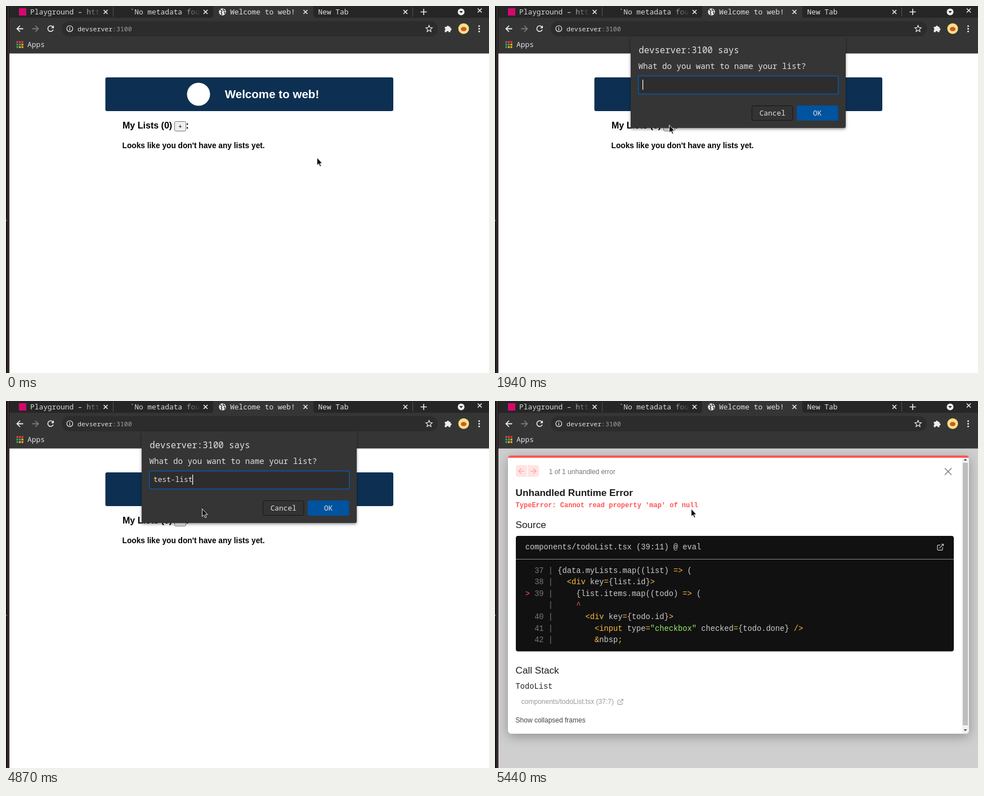
An HTML page for the animation above (8 s loop, 858 by 653 pixels).

```html
<!DOCTYPE html>
<html lang="en">
<head>
<meta charset="utf-8">
<title>List prompt</title>
<style>
  html, body { margin: 0; width: 100%; height: 100%; overflow: hidden; background: #fff; }
  svg { position: absolute; left: 0; top: 0; overflow: visible; }
  text { white-space: pre; font-family: "Liberation Sans", Arial, sans-serif; }
  .ui { font: 12.86px "Noto Sans Mono", "DejaVu Sans Mono", monospace; fill: #e2e2e2; }
  .mono { font: 13.71px "Liberation Mono", monospace; }
  .b { font-weight: bold; }
  .h { font-size: 17.14px; fill: #1b1b1b; }
  .s { font-size: 12px; }
  .line { fill: none; stroke: #eee; stroke-width: 1.6; }
  #prompt {
    left: 241px; top: 54px; border-radius: 3px; background: #353535;
    box-shadow: 0 2px 5px rgba(0, 0, 0, .45); transform-origin: 50% 50%;
  }
</style>
</head>
<body>
<svg id="stage" width="858" height="653" viewBox="0 0 858 653">
  <defs>
    <linearGradient id="fade1" gradientUnits="userSpaceOnUse" x1="136" x2="170" y1="0" y2="0">
      <stop stop-color="#d8d8d8"/><stop offset="1" stop-color="#262626"/>
    </linearGradient>
    <linearGradient id="fade2" gradientUnits="userSpaceOnUse" x1="312" x2="347" y1="0" y2="0">
      <stop stop-color="#d8d8d8"/><stop offset="1" stop-color="#262626"/>
    </linearGradient>
    <path id="x" class="line" d="M-3.5 -3.5 L3.5 3.5 M3.5 -3.5 L-3.5 3.5"/>
    <g id="out" fill="none" stroke-width="1.2">
      <path d="M0 -4 H-3.5 Q-5 -4 -5 -2.5 V3.5 Q-5 5 -3.5 5 H2.5 Q4 5 4 3.5 V0 M2 -5.5 H5.5 V-2 M5.5 -5.5 L-1.5 1.5"/>
    </g>
    <path id="arrow" d="M5 0 H-5 M0 -5 L-5 0 L0 5"/>
  </defs>

  <!-- page -->
  <rect width="858" height="653" fill="#fff"/>
  <g id="page">
    <rect x="176.5" y="127" width="511.5" height="60" rx="3" fill="#0d3052"/>
    <circle cx="342" cy="157" r="20.5" fill="#fff"/>
    <text class="b" x="388.7" y="164" font-size="20.57" fill="#fff">Welcome to web!</text>
    <text class="b" x="207" y="218" font-size="16.05">My Lists (0)</text>
    <rect id="add" x="299.5" y="205.5" width="20" height="17" rx="2" fill="#efefef" stroke="#767676"/>
    <text x="309.6" y="218" font-size="11.43" text-anchor="middle">+</text>
    <text class="b" x="319.6" y="218" font-size="16.05">:</text>
    <text class="b" x="206.6" y="252.7" font-size="13.71">Looks like you don't have any lists yet.</text>
  </g>

  <!-- error overlay -->
  <g id="error">
    <rect x="6" y="84" width="852" height="569" fill="#cfcfcf"/>
    <rect x="23" y="97" width="819" height="495" rx="6" fill="#fff"
      style="filter: drop-shadow(0 5px 10px rgba(0,0,0,.3))"/>
    <path d="M23 103 Q23 97 29 97 H836 Q842 97 842 103 V101 H23 Z" fill="#ff5555"/>
    <path d="M23.3 101 Q24 97 29 97 H836 Q841 97 841.7 101 Z" fill="#ff5555"/>
    <path d="M829 101 H842 V586 Q842 592 836 592 H829 Z" fill="#f1f1f1"/>
    <rect x="831" y="110" width="9" height="467" fill="#bdbdbd"/>
    <path d="M832.5 106 L835.5 102.5 L838.5 106 Z M832.5 584 L835.5 587.5 L838.5 584 Z" fill="#505050"/>
    <path d="M57 114 H41 Q37 114 37 118 V131 Q37 135 41 135 H57 Z M58 114 H74 Q78 114 78 118 V131 Q78 135 74 135 H58 Z" fill="#ffe4e4"/>
    <g fill="none" stroke="#ffaaaa" stroke-width="1.5">
      <use href="#arrow" transform="translate(47 124.7)"/>
      <use href="#arrow" transform="translate(68 124.7) scale(-1 1)"/>
    </g>
    <text class="s" x="95.7" y="130" fill="#757575">1 of 1 unhandled error</text>
    <path d="M799 119.5 L811 131.5 M811 119.5 L799 131.5" stroke="#777" stroke-width="1.4"/>
    <text class="h b" x="36.6" y="169">Unhandled Runtime Error</text>
    <text class="mono b" x="36.6" y="188.6" fill="#ff5555" style="font-size:12px">TypeError: Cannot read property 'map' of null</text>
    <text class="h" x="36.6" y="226">Source</text>
    <rect x="37" y="240" width="778" height="205.5" rx="4" fill="#111"/>
    <rect x="37" y="281" width="778" height="1" fill="#8a8a8a"/>
    <text class="mono" x="53.7" y="264" fill="#ccc">components/todoList.tsx (39:11) @ eval</text>
    <use href="#out" x="791" y="260.3" stroke="#ccc"/>
    <g id="code" fill="#ccc"></g>
    <text class="h" x="36.6" y="485">Call Stack</text>
    <text class="mono" x="36.6" y="512" fill="#222">TodoList</text>
    <text class="s" x="46.8" y="539" fill="#999">components/todoList.tsx (37:7)</text>
    <use href="#out" transform="translate(222.5 535.5) scale(.88)" stroke="#999"/>
    <text class="s" x="36.6" y="572" fill="#444">Show collapsed frames</text>
  </g>

  <!-- window edge and browser chrome -->
  <rect width="6" height="653" fill="#1a1213"/>
  <rect x="3" width="1.5" height="653" fill="#4a4445"/>
  <rect y="380" width="2" height="3" fill="#4a4445"/>
  <rect x="6" width="852" height="22" fill="#262626"/>
  <rect x="6" y="21" width="852" height="63.5" fill="#353535"/>
  <path d="M362 22 Q368 21 368 15 V0 H546 V15 Q546 21 552 22 Z" fill="#353535"/>
  <path d="M190.5 2 V19 M722.5 2 V19" stroke="#555"/>
  <rect x="23" y="4" width="13" height="13" fill="#d6086f"/>
  <text class="ui" x="43" y="14.5" style="fill:url(#fade1)">Playground – htt</text>
  <text class="ui" x="220.5" y="14.5" style="fill:url(#fade2)">`No metadata fou</text>
  <circle cx="384.5" cy="10.5" r="6.2" fill="#eee"/>
  <path d="M380 7 Q384 7 383.5 10 Q381 11 383.5 13.5 L383 16 M386 5 Q385 8 389 8.5 M387 11 Q390 11 388 14" fill="none" stroke="#353535" stroke-width="1.6"/>
  <text class="ui" x="398" y="14.5">Welcome to web!</text>
  <text class="ui" x="554.5" y="14.5">New Tab</text>
  <use href="#x" x="177" y="10.5"/><use href="#x" x="354.5" y="10.5"/>
  <use href="#x" x="532" y="10.5"/><use href="#x" x="709.5" y="10.5"/>
  <use href="#x" x="841.5" y="8"/>
  <path class="line" d="M736.5 10.5 H747.5 M742 5 V16"/>
  <circle cx="808.5" cy="10.5" r="6" fill="#eee"/>
  <path d="M805.3 9 H811.7 L808.5 12.8 Z" fill="#262626"/>

  <g class="line">
    <use href="#arrow" transform="translate(25 40.5) scale(1.1)"/>
    <use href="#arrow" transform="translate(52 40.5) scale(-1.1 1.1)" stroke="#7b7b7b"/>
    <path d="M83.5 37.5 A5 5 0 1 0 84 42"/>
  </g>
  <path d="M85 34.5 V39.5 H80 Z" fill="#eee"/>
  <rect x="99" y="27" width="668" height="27" rx="13.5" fill="#2c2c2c"/>
  <circle cx="113.3" cy="40.3" r="5.3" class="line" style="stroke-width:1.2"/>
  <path d="M113.3 39.6 V43.4 M113.3 37 V38.4" class="line" style="stroke-width:1.3"/>
  <text class="ui" x="127" y="44.5" style="font-size:11.5px">devserver<tspan fill="#9c9c9c">:3100</tspan></text>
  <path d="M751.5 34.5 L753.1 38.3 L757.2 38.7 L754.1 41.4 L755 45.4 L751.5 43.3 L748 45.4 L748.9 41.4 L745.8 38.7 L749.9 38.3 Z" class="line" style="stroke-width:1.2"/>
  <path d="M779.5 37 H783 A2 2 0 1 1 787 37 H789.5 V39.5 A2 2 0 1 1 789.5 43.5 V46.5 H786.5 A2 2 0 0 0 782.5 46.5 H779.5 V43 A2 2 0 0 0 779.5 39.5 Z" fill="#eee"/>
  <circle cx="813" cy="40.3" r="9.5" fill="#f8e084"/>
  <ellipse cx="813" cy="41" rx="5" ry="3.8" fill="#d0562e"/>
  <g fill="#eee"><circle cx="840.5" cy="35.8" r="1.5"/><circle cx="840.5" cy="40.5" r="1.5"/><circle cx="840.5" cy="45.2" r="1.5"/></g>
  <g id="apps"></g>
  <text class="ui" x="38" y="73">Apps</text>
</svg>

<svg id="prompt" width="382" height="163" viewBox="241 54 382 163">
  <text class="ui" x="255.3" y="83.5" style="font-size:15.65px">devserver:3100 says</text>
  <text class="ui" x="254.5" y="111.5" style="font-size:14.2px">What do you want to name your list?</text>
  <rect id="field" x="254.8" y="124.5" width="355" height="32" rx="2.5" fill="#2d2d2d" stroke="#0a57a4" stroke-width="1.7"/>
  <text class="ui" id="typed" x="262" y="144"></text>
  <rect id="caret" y="131" width="1.2" height="18" fill="#fff"/>
  <rect x="456.5" y="177.5" width="72.5" height="26" rx="2.5" fill="#333" stroke="#171717"/>
  <text class="ui" x="492.8" y="194.5" text-anchor="middle">Cancel</text>
  <rect x="536" y="177" width="73.5" height="27" rx="2.5" fill="#00539f"/>
  <text class="ui" x="572.8" y="194.5" text-anchor="middle">OK</text>
</svg>

<svg width="858" height="653" viewBox="0 0 858 653">
  <path id="cursor" d="M.5 .8 V14.6 L3.6 11.8 L5.8 16.7 L8 15.7 L5.9 11 H10 Z" fill="#111" stroke="#fff" stroke-width=".9"/>
</svg>

<script>
const LOOP = 8000, TICK = 62.5, CHAR = 12.86 * 0.6;
const el = id => document.getElementById(id);
const show = (node, on) => { node.style.display = on ? '' : 'none'; };

// All step tables hold [tick, value] and keep the value until the next entry.
const steps = {
  typed: [[0, 0], [54, 1], [56, 2], [57, 3], [59, 4], [61, 5], [65, 6], [67, 7], [68, 8], [70, 9]],
  caret: [[0, 1], [34, 0], [42, 1], [50, 0], [54, 1], [78, 0]],
  away: [[0, 1], [27, .95], [28, .6], [29, .3], [30, .1], [31, 0],
         [82, .04], [83, .22], [84, .47], [85, .72], [86, .93], [87, 1]]
};
const path = [[7, 552, 269], [21, 309, 211], [31, 309, 211], [37, 346, 190], [39, 348, 191]];

function stepAt(table, tick) {
  let value = table[0][1];
  for (const [start, v] of table) if (tick >= start) value = v;
  return value;
}

function pointAt(tick) {
  if (tick <= path[0][0]) return path[0].slice(1);
  for (let i = 1; i < path.length; i++) {
    const [t0, x0, y0] = path[i - 1], [t1, x1, y1] = path[i];
    if (tick > t1) continue;
    const k = (tick - t0) / (t1 - t0), e = k * k * (3 - 2 * k);
    return [x0 + (x1 - x0) * e, y0 + (y1 - y0) * e].map(Math.round);
  }
  return path[path.length - 1].slice(1);
}

function buildCode() {
  const esc = s => s.replace(/&/g, '&amp;').replace(/</g, '&lt;').replace(/>/g, '&gt;');
  const span = (s, color) => `<tspan fill="${color}">${esc(s)}</tspan>`;
  const paint = src => src.split(/("[^"]*"|=>|<\w+|\/?>|[=.&;^])/).map(s =>
    s[0] === '"' ? span(s, '#98ec65') :
    s === '^' ? span(s, '#ff5555') :
    /^(=>|<\w+|\/?>|[=.&;])$/.test(s) ? span(s, '#fabb3d') : esc(s)).join('');
  const lines = [
    ['37', '{data.myLists.map((list) => ('],
    ['38', '  <div key={list.id}>'],
    ['39', '    {list.items.map((todo) => ('],
    ['  ', '    ^'],
    ['40', '      <div key={todo.id}>'],
    ['41', '        <input type="checkbox" checked={todo.done} />'],
    ['42', '        &nbsp;']
  ];
  el('code').innerHTML = lines.map(([no, src], i) => {
    const mark = no === '39' ? span('> ', '#ff5555') : '  ';
    return `<text class="mono" x="53.7" y="${305.7 + i * 20.57}">${mark}${span(no + ' | ', '#777')}${paint(src)}</text>`;
  }).join('');
}

function buildApps() {
  const [r, g, b, y] = ['#ea4335', '#34a853', '#4285f4', '#fbbc05'];
  el('apps').innerHTML = [r, r, r, g, b, y, g, y, y].map((c, i) =>
    `<rect x="${18.5 + i % 3 * 4.5}" y="${62.5 + Math.floor(i / 3) * 4.5}" width="3.2" height="3.2" fill="${c}"/>`).join('');
}

function draw(ms) {
  const tick = Math.floor((ms + 3) / TICK);
  const [x, y] = pointAt(tick);
  el('cursor').setAttribute('transform', `translate(${x} ${y})`);
  el('add').setAttribute('fill', tick >= 20 && tick < 36 ? '#e8e8e8' : '#efefef');

  const away = stepAt(steps.away, tick), prompt = el('prompt');
  show(prompt, away < 1);
  prompt.style.opacity = 1 - away * away;
  prompt.style.transform = away === 0 ? 'none' :
    `perspective(300px) translateY(${-13.5 * away}px) scale(${1 + .011 * away}) rotateX(${2.3 * away}deg)`;

  const count = stepAt(steps.typed, tick);
  el('typed').textContent = 'test-list'.slice(0, count);
  el('caret').setAttribute('x', Math.floor(262.3 + count * CHAR));
  show(el('caret'), stepAt(steps.caret, tick));
  el('field').setAttribute('stroke', tick < 82 ? '#0a57a4' : '#2a2a2a');

  show(el('page'), tick < 84);
  show(el('error'), tick >= 87);
}

buildCode();
buildApps();
const begin = performance.now();
function loop() {
  draw((performance.now() - begin) % LOOP);
  requestAnimationFrame(loop);
}
loop();
</script>
</body>
</html>
```
